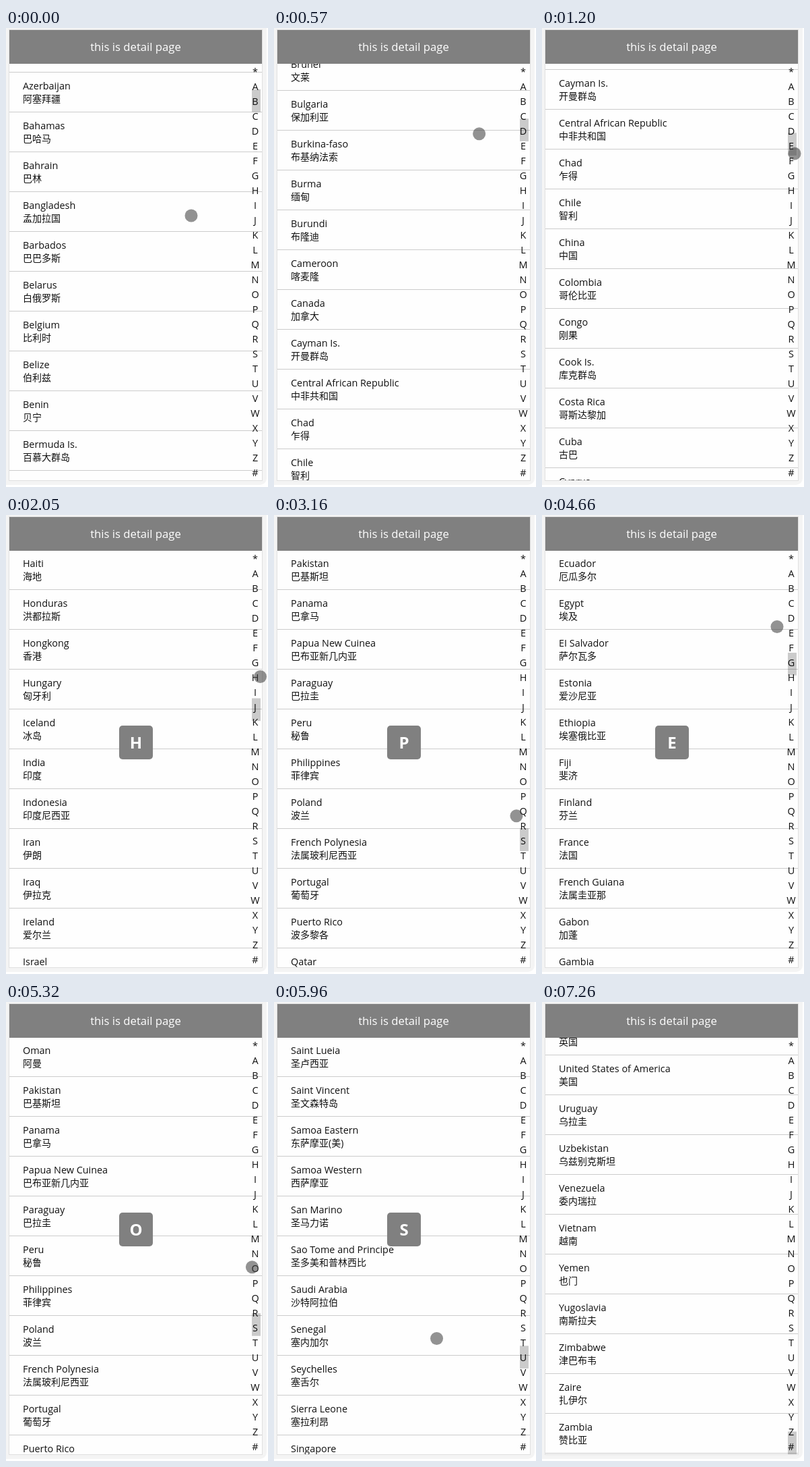
An HTML page with a canvas that plays this animation: 389 px wide and 680 px high, repeating every 9980 ms.

```html
<!DOCTYPE html>
<html lang="zh-CN">
<head>
<meta charset="utf-8">
<title>Country list</title>
<style>
html, body { margin: 0; width: 100%; height: 100%; overflow: hidden; background: #fff; }
canvas { display: block; }
</style>
</head>
<body>
<canvas id="stage" width="389" height="680"></canvas>
<script>
const ctx = document.getElementById('stage').getContext('2d');
const LOOP = 9980;
const FAMILY = '"Open Sans", "Noto Sans CJK SC", "Noto Sans CJK", sans-serif';
const ROW = 59, TOP = 53, VIEW = 617;

const countries = (
  'Angola 安哥拉|Afghanistan 阿富汗|Albania 阿尔巴尼亚|Algeria 阿尔及利亚|Andorra 安道尔共和国|Anguilla 安圭拉岛|' +
  'Antigua and Barbuda 安提瓜和巴布达|Argentina 阿根廷|Armenia 亚美尼亚|Ascension 阿森松|Australia 澳大利亚|' +
  'Austria 奥地利|Azerbaijan 阿塞拜疆|Bahamas 巴哈马|Bahrain 巴林|Bangladesh 孟加拉国|Barbados 巴巴多斯|' +
  'Belarus 白俄罗斯|Belgium 比利时|Belize 伯利兹|Benin 贝宁|Bermuda Is. 百慕大群岛|Bolivia 玻利维亚|' +
  'Botswana 博茨瓦纳|Brazil 巴西|Brunei 文莱|Bulgaria 保加利亚|Burkina-faso 布基纳法索|Burma 缅甸|' +
  'Burundi 布隆迪|Cameroon 喀麦隆|Canada 加拿大|Cayman Is. 开曼群岛|Central African Republic 中非共和国|' +
  'Chad 乍得|Chile 智利|China 中国|Colombia 哥伦比亚|Congo 刚果|Cook Is. 库克群岛|Costa Rica 哥斯达黎加|' +
  'Cuba 古巴|Cyprus 塞浦路斯|Czech Republic 捷克|Denmark 丹麦|Djibouti 吉布提|Dominica Rep. 多米尼加共和国|' +
  'Ecuador 厄瓜多尔|Egypt 埃及|EI Salvador 萨尔瓦多|Estonia 爱沙尼亚|Ethiopia 埃塞俄比亚|Fiji 斐济|' +
  'Finland 芬兰|France 法国|French Guiana 法属圭亚那|Gabon 加蓬|Gambia 冈比亚|Georgia 格鲁吉亚|Germany 德国|' +
  'Ghana 加纳|Gibraltar 直布罗陀|Greece 希腊|Grenada 格林纳达|Guam 关岛|Guatemala 危地马拉|Guinea 几内亚|' +
  'Guyana 圭亚那|Haiti 海地|Honduras 洪都拉斯|Hongkong 香港|Hungary 匈牙利|Iceland 冰岛|India 印度|' +
  'Indonesia 印度尼西亚|Iran 伊朗|Iraq 伊拉克|Ireland 爱尔兰|Israel 以色列|Italy 意大利|Ivory Coast 科特迪瓦|' +
  'Jamaica 牙买加|Japan 日本|Jordan 约旦|Kampuchea (Cambodia ) 柬埔寨|Kazakstan 哈萨克斯坦|Kenya 肯尼亚|' +
  'Korea 韩国|Kuwait 科威特|Kyrgyzstan 吉尔吉斯坦|Laos 老挝|Latvia 拉脱维亚|Lebanon 黎巴嫩|Lesotho 莱索托|' +
  'Liberia 利比里亚|Libya 利比亚|Liechtenstein 列支敦士登|Lithuania 立陶宛|Luxembourg 卢森堡|Macao 澳门|' +
  'Madagascar 马达加斯加|Malawi 马拉维|Malaysia 马来西亚|Maldives 马尔代夫|Mali 马里|Malta 马耳他|' +
  'Mariana Is 马里亚那群岛|Martinique 马提尼克|Mauritius 毛里求斯|Mexico 墨西哥|Moldova 摩尔多瓦|Monaco 摩纳哥|' +
  'Mongolia 蒙古|Montserrat Is 蒙特塞拉特岛|Morocco 摩洛哥|Mozambique 莫桑比克|Namibia 纳米比亚|Nauru 瑙鲁|' +
  'Nepal 尼泊尔|Netheriands Antilles 荷属安的列斯|Netherlands 荷兰|New Zealand 新西兰|Nicaragua 尼加拉瓜|' +
  'Niger 尼日尔|Nigeria 尼日利亚|North Korea 朝鲜|Norway 挪威|Oman 阿曼|Pakistan 巴基斯坦|Panama 巴拿马|' +
  'Papua New Cuinea 巴布亚新几内亚|Paraguay 巴拉圭|Peru 秘鲁|Philippines 菲律宾|Poland 波兰|' +
  'French Polynesia 法属玻利尼西亚|Portugal 葡萄牙|Puerto Rico 波多黎各|Qatar 卡塔尔|Reunion 留尼旺|' +
  'Romania 罗马尼亚|Russia 俄罗斯|Saint Lueia 圣卢西亚|Saint Vincent 圣文森特岛|Samoa Eastern 东萨摩亚(美)|' +
  'Samoa Western 西萨摩亚|San Marino 圣马力诺|Sao Tome and Principe 圣多美和普林西比|Saudi Arabia 沙特阿拉伯|' +
  'Senegal 塞内加尔|Seychelles 塞舌尔|Sierra Leone 塞拉利昂|Singapore 新加坡|Slovakia 斯洛伐克|' +
  'Slovenia 斯洛文尼亚|Solomon Is 所罗门群岛|Somali 索马里|South Africa 南非|Spain 西班牙|Sri Lanka 斯里兰卡|' +
  'St.Lucia 圣卢西亚|St.Vincent 圣文森特|Sudan 苏丹|Suriname 苏里南|Swaziland 斯威士兰|Sweden 瑞典|' +
  'Switzerland 瑞士|Syria 叙利亚|Taiwan 台湾|Tajikstan 塔吉克斯坦|Tanzania 坦桑尼亚|Thailand 泰国|Togo 多哥|' +
  'Tonga 汤加|Trinidad and Tobago 特立尼达和多巴哥|Tunisia 突尼斯|Turkey 土耳其|Turkmenistan 土库曼斯坦|' +
  'Uganda 乌干达|Ukraine 乌克兰|United Arab Emirates 阿拉伯联合酋长国|United Kiongdom 英国|' +
  'United States of America 美国|Uruguay 乌拉圭|Uzbekistan 乌兹别克斯坦|Venezuela 委内瑞拉|Vietnam 越南|' +
  'Yemen 也门|Yugoslavia 南斯拉夫|Zimbabwe 津巴布韦|Zaire 扎伊尔|Zambia 赞比亚'
).split('|').map(s => s.match(/^([\x00-\x7f]+) (.+)$/).slice(1));

const TOTAL = countries.length * ROW;
const MAX = TOTAL - VIEW;
const letters = '*ABCDEFGHIJKLMNOPQRSTUVWXYZ#';
const groupTop = c => countries.findIndex(([en]) => en[0] === c) * ROW;

// Screen refresh times: [first, last, count]
const bursts = [[150, 1080, 8], [1200, 2200, 8], [2350, 3280, 8], [3430, 4420, 8],
  [4540, 5570, 9], [5720, 6680, 8], [6830, 7260, 4]];
const ticks = [0];
for (const [a, b, n] of bursts)
  for (let i = 0; i < n; i++) ticks.push(Math.round((a + (b - a) * i / (n - 1)) / 10) * 10);
const snap = t => ticks.filter(k => k <= t).pop();

// Pointer path: time, x, y
const path = [
  [0, 275, 278], [300, 278, 190], [600, 310, 150], [1200, 375, 186], [2050, 378, 250],
  [2950, 379, 422], [3160, 359, 447], [3450, 300, 470], [3750, 285, 270], [4200, 350, 175],
  [4420, 364, 166], [4660, 334, 165], [4900, 364, 200], [5500, 366, 482], [5960, 207, 503],
  [6250, 203, 330], [6680, 192.5, 608.5], [7130, 248, 672], [7260, 256, 695]
];

function pointer(t) {
  const i = path.findIndex(p => p[0] > t);
  if (i < 0) return path[path.length - 1].slice(1);
  const [a, b] = [path[i - 1], path[i]];
  const k = (t - a[0]) / (b[0] - a[0]);
  return [a[1] + (b[1] - a[1]) * k, a[2] + (b[2] - a[2]) * k];
}

// Touches on the letter index
const presses = [[1250, 2950], [4250, 4500], [4900, 5520]];

function pickedLetter(t) {
  const press = presses.filter(p => p[0] <= t).pop();
  if (!press) return '';
  const y = pointer(Math.min(t, press[1]))[1];
  return letters[Math.round((y - 64.5) / 22)];
}

// Finger drag from t0 to t1, then decaying glide until t2
function flick(t, t0, t1, t2, from, to) {
  const drag = pointer(t0)[1] - pointer(Math.max(t0, Math.min(t, t1)))[1];
  const start = from + drag;
  if (t <= t1) return start;
  const k = Math.min(1, (t - t1) / (t2 - t1));
  return start + (to - start) * (1 - (1 - k) ** 3);
}

function scrollAt(t) {
  if (t < 1250) return flick(t, 0, 300, 1150, 694, 1878);
  if (t >= 3450 && t < 4250) return flick(t, 3450, 3750, 4400, groupTop('P'), 8900);
  if (t >= 5970) return flick(t, 5970, 6250, 6670, groupTop('S'), MAX);
  return groupTop(pickedLetter(t));
}

const toastShown = t => (t >= 1250 && t < 3500) || (t >= 4250 && t < 6100);

function box(x, y, w, h, color, r = 0) {
  ctx.fillStyle = color;
  ctx.beginPath();
  ctx.roundRect(x, y, w, h, r);
  ctx.fill();
}

function label(s, x, y, size, color = '#111', align = 'left', weight = 400) {
  ctx.font = `${weight} ${size}px ${FAMILY}`;
  ctx.textAlign = align;
  ctx.fillStyle = color;
  ctx.fillText(s, x, y);
}

function drawList(scroll) {
  ctx.save();
  ctx.beginPath();
  ctx.rect(5, TOP, 375, VIEW);
  ctx.clip();
  const first = Math.max(0, Math.floor(scroll / ROW) - 1);
  for (let i = first; i < Math.min(first + 14, countries.length); i++) {
    const y = Math.round(TOP - 1 + i * ROW - scroll);
    const [en, zh] = countries[i];
    label(en, 25, y + 25, 14.4);
    label(zh, 25, y + 44, 14);
    box(5, y + 58, 375, 1, '#ccc');
  }
  [...letters].forEach((c, i) => label(c, 370, 70 + i * 22, 14.4, '#111', 'center'));
  box(365, TOP + scroll / TOTAL * VIEW, 13, VIEW * VIEW / TOTAL, 'rgba(0,0,0,.2)');
  ctx.restore();
}

function draw(t) {
  box(0, 0, 389, 680, '#fff');
  box(-12, -12, 399, 689, '#f4f4f4', 10);
  box(4, 2, 377, 669, '#e0e0e0');
  box(5, 3, 375, 667, '#fefefe');
  drawList(scrollAt(t));
  box(5, 3, 375, 50, '#808080');
  label('this is detail page', 192.5, 34, 16.7, '#fff', 'center');
  if (toastShown(t)) {
    box(168, 312, 50, 50, '#808080', 5);
    label(pickedLetter(t), 193, 346, 24, '#fff', 'center', 700);
  }
  const [x, y] = pointer(t);
  ctx.fillStyle = 'rgba(60,60,60,.56)';
  ctx.beginPath();
  ctx.arc(x, y, 9.5, 0, Math.PI * 2);
  ctx.fill();
}

const begin = performance.now();
function loop() {
  draw(snap((performance.now() - begin) % LOOP));
  requestAnimationFrame(loop);
}
loop();
</script>
</body>
</html>
```
